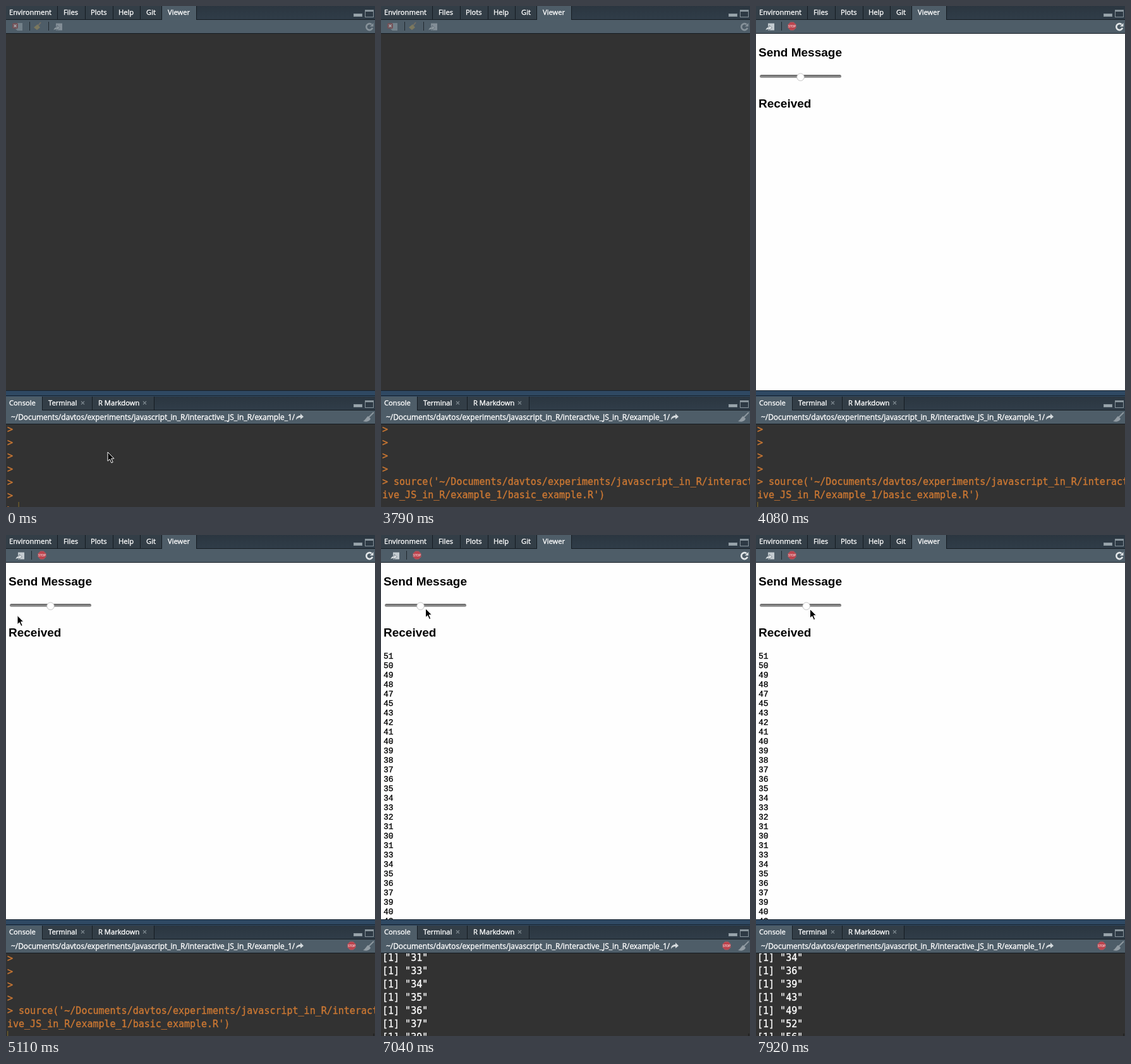
An HTML page that plays this animation: 584x794 px, repeating every 8000 ms.

```html
<!DOCTYPE html>
<html lang="en">
<head>
<meta charset="utf-8">
<title>Slider messages in the viewer pane</title>
<style>
  html, body { margin: 0; width: 100%; height: 100%; overflow: hidden; background: #323232; }
  svg { display: block; width: 584px; height: 794px; }
  text { white-space: pre; fill: currentColor; }
  .ui, .con, .log { stroke: currentColor; stroke-width: .35px; }
  .ui { font: 500 11.2px "Open Sans", "Noto Sans", sans-serif; color: #fff; }
  .path { font-size: 11.9px; }
  .con { font: 15px "DejaVu Sans Mono", monospace; }
  .head { font: bold 19px "Liberation Sans", Arial, sans-serif; color: #000; }
  .log { font: 13px "Liberation Mono", "Courier New", monospace; color: #000; }
  .sign { font: bold 4.5px "Liberation Sans", sans-serif; color: #f3cdd0; text-anchor: middle; }
</style>
</head>
<body>
<svg viewBox="0 0 584 794" xmlns="http://www.w3.org/2000/svg">
  <defs>
    <linearGradient id="bar" x2="0" y2="1">
      <stop stop-color="#2b3640"/><stop offset="1" stop-color="#303d49"/>
    </linearGradient>
    <linearGradient id="track" x2="0" y2="1">
      <stop stop-color="#606060"/><stop offset="1" stop-color="#a8a8a8"/>
    </linearGradient>
    <g id="stop">
      <path d="M-2.600-6.200H2.600L6.200-2.600V2.600L2.600 6.200H-2.600L-6.200 2.600V-2.600Z" fill="#bd434d" stroke="#a06068" stroke-width=".8"/>
      <text class="sign" y="1.600">STOP</text>
    </g>
    <g id="export">
      <path d="M4 1H14V12H4Z" fill="#c3cbd0"/>
      <path d="M0 12C1 8 3 7 6 7V4L10 8L6 12V10C4 10 2 11 0 12Z" fill="#e3e7e9" stroke="#4e5d68" stroke-width=".7"/>
    </g>
    <g id="panes" fill="none" stroke="#87939b">
      <rect x="550.5" y="12.5" width="13" height="4" fill="#9aa5ac"/>
      <rect x="568.5" y="6.5" width="13" height="11"/>
      <path d="M568 8H582" stroke-width="2"/>
    </g>
    <path id="arrow" d="M0 0V14.200L3.300 11.200L5.900 17L8.200 16L5.700 10.200H10Z" fill="#000" stroke="#fff" stroke-linejoin="round"/>
  </defs>

  <rect width="584" height="794" fill="#323232"/>
  <g id="page">
    <rect y="43" width="584" height="567" fill="#fefefe"/>
    <text class="head" x="4" y="80">Send Message</text>
    <text class="head" x="4" y="161">Received</text>
    <rect x="6" y="109" width="129" height="5" rx="2.5" fill="url(#track)"/>
    <circle id="thumb" cy="112.7" r="5.8" stroke="#b5b5b5" stroke-width=".8"/>
    <g id="log"></g>
  </g>

  <g id="topBar"></g>
  <g id="idleTools">
    <g opacity=".6">
      <path d="M14 27H26V39H18L14 35Z" fill="#8d99a1"/>
      <rect x="10" y="27" width="9" height="9" rx="2" fill="#8a4a4c"/>
      <path d="M12.500 29.500L16.500 33.500M16.500 29.500L12.500 33.500" stroke="#ddd" stroke-width="1.500"/>
      <path d="M44 34L50 29L54 34L49 38Z" fill="#9a8a58"/>
      <path d="M51 31L55 26" stroke="#8c7a60" stroke-width="2"/>
    </g>
    <path d="M37.500 25V39M67.500 25V39" stroke="#20282f"/>
    <use href="#export" x="75" y="26.500" opacity=".45"/>
  </g>
  <g id="runTools">
    <use id="exportIcon" href="#export" x="15" y="26.500"/>
    <path d="M40.500 25V39" stroke="#20282f"/>
    <use href="#stop" x="57" y="32"/>
  </g>
  <g id="reload">
    <path d="M578.500 29.200A5 5 0 1 0 580 34.800" fill="none" stroke="currentColor" stroke-width="2.600"/>
    <path d="M576 32.500H581.500V27Z" fill="currentColor"/>
  </g>

  <g id="lowBar"></g>
  <text class="ui path" x="8" y="656">~/Documents/davtos/experiments/javascript_in_R/interactive_JS_in_R/example_1/</text>
  <path d="M459 656C459 651 462 649 466 649V646L471 651L466 655V652C463 652 461 653 459 656Z" fill="#d5dadd"/>
  <path d="M582 644L574 652" stroke="#8d979e" stroke-width="2"/>
  <path d="M565 658C569 656 570 652 573 650L577 654C576 658 570 660 565 658Z" fill="#929ca3"/>
  <use id="busy" href="#stop" x="547" y="651"/>
  <svg y="663" width="584" height="131" viewBox="0 663 584 131">
    <g id="console"></g>
    <rect id="caret" y="786" width="1.300" height="8" fill="#74632b"/>
    <rect id="scroll" x="581.500" y="790" width="1" height="4" fill="#151515"/>
  </svg>
  <use id="mouse" href="#arrow"/>
</svg>

<script>
const LOOP = 8000;
const $ = id => document.getElementById(id);
const text = (cls, x, y, s, extra = '') => `<text class="${cls}" x="${x}" y="${y}" ${extra}>${s}</text>`;
const rect = (x, y, w, h, fill) => `<rect x="${x}" y="${y}" width="${w}" height="${h}" fill="${fill}"/>`;

// A tab is [label, text x, left edge, right edge, closable].
function tabBar(y, tabs, active) {
  const edge = '#151c22';
  let out = rect(0, y, 584, 22, 'url(#bar)') + rect(0, y + 21, 584, 1, edge) +
            rect(0, y + 22, 584, 21, '#4e5d68') + rect(0, y + 43, 584, 1, edge);
  tabs.forEach(([label, x, left, right, close], i) => {
    const on = i === active;
    out += rect(left, y, right - left, on ? 22 : 21, on ? '#4e5d68' : '#333e47') +
           rect(right, y, 1, 22, edge) + text('ui', x, y + 14, label);
    if (close) out += `<path d="M${right - 17} ${y + 7.5}l5 5m0-5l-5 5" stroke="#7b868d" stroke-width="1.2"/>`;
  });
  return out + `<use href="#panes" y="${y}"/>`;
}

$('topBar').innerHTML = tabBar(0, [
  ['Environment', 5, 0, 81], ['Files', 91, 82, 125], ['Plots', 134, 126, 169],
  ['Help', 178, 170, 212], ['Git', 222, 213, 246], ['Viewer', 256, 247, 301]
], 5);
$('lowBar').innerHTML = rect(0, 609, 584, 10, '#2f4963') + rect(0, 609, 584, 1, '#17222d') +
  rect(0, 617, 584, 1, '#17222d') + tabBar(619, [
  ['Console', 5, 0, 57], ['Terminal', 67, 58, 136, true], ['R Markdown', 146, 137, 234, true]
], 0);

const values = [51, 50, 49, 48, 47, 45, 43, 42, 41, 40, 39, 38, 37, 36, 35, 34, 33, 32, 31, 30,
  31, 33, 34, 35, 36, 37, 39, 40, 42, 43, 45, 47, 50, 53, 56, 59, 62, 64, 65, 63, 59, 55, 50, 46,
  42, 39, 37, 35, 34, 36, 39, 43, 49, 52, 56, 57, 58];
const command = ["> source('~/Documents/davtos/experiments/javascript_in_R/interact",
  "ive_JS_in_R/example_1/basic_example.R')"];

// Dragging: mouse x and y, slider value, messages printed so far.
const drag = (x, y, value, printed) =>
  ({ mouse: [x, y], value, printed, logged: printed + 2, top: printed + 1, caret: null, pressed: false });

const steps = [
  [0, { mouse: [161, 707], top: 0, caret: 19.5, value: 50, printed: 0, logged: 0 }],
  [500, { mouse: [157.5, 700.5] }],
  [1240, { mouse: [142.5, 691.5] }],
  [1390, { mouse: null }],
  [3790, { sent: true, top: 2, caret: null }],
  [3930, { running: true, caret: 2 }],
  [4080, { page: true }],
  [4380, { scroll: true }],
  [4670, { busy: true, mouse: [8.5, 127.5] }],
  [5110, { mouse: [18, 127.5] }],
  [5260, { mouse: [59.5, 127.5] }],
  [5410, { mouse: [69.5, 118] }],
  [5550, { mouse: [70.5, 112.5] }],
  [6300, { pressed: true }],
  [6600, { mouse: [71.5, 112.5], value: 51, printed: 1, logged: 1, top: 3 }],
  [6740, drag(62.5, 115.5, 40, 8)],
  [6890, drag(52, 116.5, 31, 18)],
  [7040, drag(70.5, 116.5, 43, 27)],
  [7190, drag(82, 116.5, 56, 32)],
  [7330, drag(93.5, 117, 65, 37)],
  [7480, drag(74.5, 117, 50, 41)],
  [7630, drag(61, 117.5, 36, 46)],
  [7780, drag(69, 117.5, 43, 50)],
  [7920, drag(85.5, 117.5, 58, 55)]
];
let state = {};
const scenes = steps.map(([at, change]) => ({ at, ...(state = { ...state, ...change }) }));

function consoleRows(s) {
  const lines = Array(s.sent ? 6 : 7).fill('>');
  if (s.sent) lines.push(...command);
  const start = lines.length;
  lines.push(...values.slice(0, s.printed).map(v => `[1] "${v}"`));
  return lines.slice(s.top, s.top + 7).map((line, k) => {
    const color = s.top + k < start ? '#cc7833' : '#fff';
    const y = (line === '>' ? 676 : 675) + 21 * k;
    return text('con', 2, y, line.replace('>', '&gt;'), `color="${color}"`);
  }).join('');
}

const show = (id, on) => { $(id).style.display = on ? '' : 'none'; };

function draw(s) {
  show('page', s.page);
  show('idleTools', !s.running);
  show('runTools', s.running);
  show('busy', s.busy);
  show('scroll', s.scroll);
  show('mouse', s.mouse);
  show('caret', s.caret !== null);
  if (s.mouse) $('mouse').setAttribute('transform', `translate(${s.mouse})`);
  if (s.caret !== null) $('caret').setAttribute('x', s.caret);
  $('exportIcon').setAttribute('opacity', s.page ? 1 : 0.45);
  $('reload').setAttribute('color', s.page ? '#e3e7e9' : '#87929a');
  $('thumb').setAttribute('cx', 70.5 + (s.value - 50) * 1.14);
  $('thumb').setAttribute('fill', s.pressed ? '#e6e6e6' : '#fff');
  $('log').innerHTML = values.slice(0, Math.min(s.logged, 29))
    .map((v, i) => text('log', 4, 196 + 15 * i, v)).join('');
  $('console').innerHTML = consoleRows(s);
}

let current;
function tick() {
  const t = performance.now() % LOOP;
  const scene = scenes.findLast(s => s.at <= t);
  if (scene !== current) draw(current = scene);
  requestAnimationFrame(tick);
}
tick();
</script>
</body>
</html>
```
